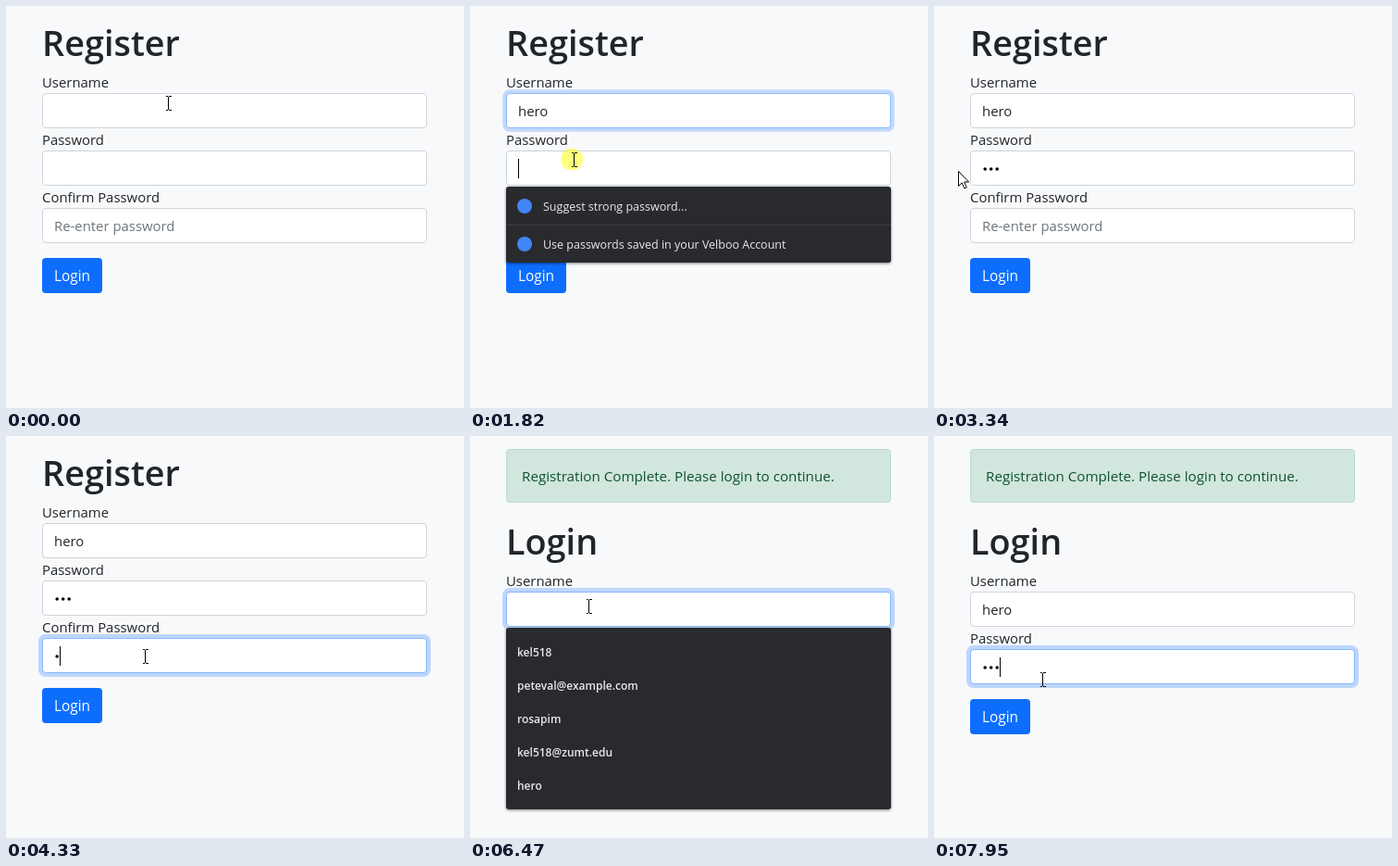
These frames come from a looping animation (495x434 px, 8000 ms). An HTML page:

```html
<!DOCTYPE html>
<html lang="en">
<head>
<meta charset="utf-8">
<title>Register and login</title>
<style>
  html, body { margin: 0; width: 100%; height: 100%; overflow: hidden; background: #f8f9fa; }
  svg { display: block; }
  text { font: 14.9px "Open Sans", "Noto Sans", sans-serif; fill: #212529; white-space: pre; }
  .title { font-size: 37.8px; font-weight: 600; }
  .hint { fill: #6c757d; }
  .box { fill: #fff; }
  .ring { fill: none; stroke: #0d6efd; }
  .btn-text { font-size: 15.4px; fill: #fff; }
  .note { fill: #d1e7dd; stroke: #badbcc; }
  .note-text { font-size: 15.2px; fill: #0f5132; }
  .drop { filter: drop-shadow(0 1px 1.5px rgba(0, 0, 0, .5)); }
  .drop text { font-size: 12.5px; fill: #e8eaed; }
  .drop .name { font-size: 12px; font-weight: 600; }
  .panel { fill: #292a2d; }
  .hover { fill: #3f4042; }
  .line { stroke: #3f4042; }
  .icon { fill: #4285f4; }
  .caret { fill: #000; }
  .click { fill: #ffff00; fill-opacity: .5; }
  .cursor { fill: #fff; stroke: #000; stroke-linejoin: round; }
  #beam { fill: none; shape-rendering: crispEdges; }
</style>
</head>
<body>
<svg id="stage" width="495" height="434" viewBox="0 0 495 434"></svg>
<script>
const LOOP = 8000, SUBMIT = 5130, PRESS = 4930, FADE = 150;
const USER = 'hero';
const names = ['kel518', 'peteval@example.com', 'rosapim', 'kel518@zumt.edu', USER];
const SUGGEST = 'Suggest strong password...';
const SAVED = 'Use passwords saved in your Velboo Account';

// focus: field gains focus and opens its list; input: first entry; blur: focus lost
const fields = [
  { page: 0, y: 94, label: 'Username', focus: 420, input: 1400, blur: 1810 },
  { page: 0, y: 156, label: 'Password', list: [SUGGEST, SAVED], focus: 1810, input: 2620, blur: 3150 },
  { page: 0, y: 218, label: 'Confirm Password', hint: 'Re-enter password', list: [SAVED], focus: 3830, input: 4330, blur: PRESS },
  { page: 1, y: 168, label: 'Username', focus: 6170, input: 6760, blur: 7150 },
  { page: 1, y: 230, label: 'Password', list: [SAVED], focus: 7150, input: 7480, blur: Infinity }
];
const KEY_GAP = 110;
const clicks = [400, 1380, 1780, 3140, 3810, 4920, 6130, 6740, 7130];

// time, x, y of the pointer
const path = [
  [0, 175, 105], [100, 175, 105], [380, 172, 116], [930, 172, 116],
  [1300, 75, 302], [1410, 75, 302], [1740, 108, 165], [1820, 112, 166], [2000, 114, 172],
  [2850, 114, 172], [3120, 28, 182], [3220, 28, 182], [3340, 26, 178], [3400, 26, 178],
  [3760, 150, 238], [4480, 150, 238], [4800, 78, 291], [5350, 78, 291],
  [6050, 128, 184], [6490, 128, 184], [6700, 76, 375], [6780, 76, 375],
  [7080, 117, 250], [7870, 117, 250], [7945, 117, 263], [LOOP, 117, 263]
];

const stage = document.getElementById('stage');
const text = (x, y, s, cls = '') => `<text x="${x}" y="${y}" class="${cls}">${s}</text>`;
const rect = (x, y, w, h, r, cls) =>
  `<rect x="${x}" y="${y}" width="${w}" height="${h}" rx="${r}" class="${cls}"/>`;

function fieldMarkup(f) {
  const dots = [0, 1, 2].map(i => `<circle class="dot" cx="${55.2 + i * 6.5}" cy="${f.y + 20}" r="1.8"/>`).join('');
  return `<g class="field">${text(39, f.y - 6, f.label)}
    ${rect(39, f.y, 416, 38, 4, 'ring')}${rect(39.5, f.y + .5, 415, 37, 3.5, 'box')}
    ${f.hint ? text(52, f.y + 25, f.hint, 'hint') : ''}
    ${f.list ? dots : text(52, f.y + 25, USER, 'value')}
    ${rect(52, f.y + 9, 1, 21, 0, 'caret')}</g>`;
}

function dropMarkup(f) {
  const top = f.y + 39;
  const rows = f.list
    ? f.list.map((s, i) => {
        const mid = top + 21 + i * 41;
        const rule = i ? `<path class="line" d="M39 ${mid - 20.5}h416"/>` : '';
        return `${rule}<circle class="icon" cx="59" cy="${mid}" r="8"/>${text(79, mid + 4.5, s)}`;
      })
    : names.map((s, i) => text(51, top + 30.5 + i * 36, s, 'name'));
  const height = f.list ? f.list.length * 41 : 196;
  return `<g class="drop">${rect(39, top, 416, height, 3, 'panel')}
    ${rect(39, top, 416, f.list ? 41 : 36, 0, 'hover')}${rows.join('')}</g>`;
}

function pageMarkup(page, title, shift, buttonY, extra) {
  return `<g class="page">${extra}${text(39, 54 + shift, title, 'title')}
    ${fields.filter(f => f.page === page).map(fieldMarkup).join('')}
    ${rect(39, buttonY, 65, 38, 4, 'ring btn-ring')}
    <rect class="btn" x="39" y="${buttonY}" width="65" height="38" rx="4" fill="#0d6efd"/>
    ${text(52, buttonY + 25, 'Login', 'btn-text')}</g>`;
}

const note = rect(39.5, 14.5, 415, 57, 3.5, 'note') +
  text(56, 49, 'Registration Complete. Please login to continue.', 'note-text');

stage.innerHTML = pageMarkup(0, 'Register', 0, 272, '') + pageMarkup(1, 'Login', 74, 284, note) +
  fields.map(dropMarkup).join('') + `
  <circle class="click" r="12"/>
  <path class="cursor" id="beam" d="M-3-7.5h2l1 1 1-1h2M0-6.5v13M-3 7.5h2l1-1 1 1h2"/>
  <path class="cursor" id="arrow" d="M.5 .5v16l3.7-3.6 2.7 6 2.4-1-2.7-5.9h5z"/>
  <path class="cursor" id="hand" d="M-2.5 12V2.6a1.75 1.75 0 0 1 3.5 0V8.5a1.6 1.6 0 0 1 3.3 .6a1.6 1.6 0 0 1 3.2 .8
    a1.5 1.5 0 0 1 2.8 1V15c0 3-2 3.5-2 7.5H-1c0-3-3-4-5.5-9c-1-2 1.5-3.2 4-.5zM1 8.5v3M4.300 9.100v3M7.500 9.900v2.500"/>`;

const all = s => [...stage.querySelectorAll(s)];
const show = (el, on) => { el.style.display = on ? '' : 'none'; };
const pages = all('.page'), drops = all('.drop'), fieldEls = all('.field');
const [clickEl] = all('.click');
const cursors = all('.cursor');
const buttons = all('.btn'), buttonRings = all('.btn-ring');
fields.forEach((f, i) => {
  const el = fieldEls[i], pick = s => el.querySelector(s);
  Object.assign(f, {
    ring: pick('.ring'), box: pick('.box'), hintEl: pick('.hint'), value: pick('.value'),
    caret: pick('.caret'), dots: [...el.querySelectorAll('.dot')],
    drop: drops[i], hover: drops[i].querySelector('.hover')
  });
});

const clamp = v => Math.max(0, Math.min(1, v));
const mix = (a, b, k) => a + (b - a) * k;

function pointer(t) {
  t = Math.max(0, t);
  const i = Math.max(1, path.findIndex(p => p[0] >= t));
  const [t0, x0, y0] = path[i - 1], [t1, x1, y1] = path[i];
  const k = clamp((t - t0) / (t1 - t0)), e = k * k * (3 - 2 * k);
  return { x: mix(x0, x1, e), y: mix(y0, y1, e) };
}

function setRing(el, k) {
  el.style.strokeWidth = 8 * k;
  el.style.strokeOpacity = .25 * k;
}

function drawField(f, t) {
  const k = clamp((t - f.focus) / FADE) - clamp((t - f.blur) / FADE);
  setRing(f.ring, k);
  f.box.style.stroke = `rgb(${mix(206, 134, k)}, ${mix(212, 183, k)}, ${mix(218, 254, k)})`;

  const filled = t >= f.input;
  const typed = filled ? Math.min(3, 1 + Math.floor((t - f.input) / KEY_GAP)) : 0;
  if (f.hintEl) show(f.hintEl, !filled);
  if (f.value) show(f.value, filled);
  f.dots.forEach((d, i) => show(d, i < typed));

  const last = !filled ? f.focus : f.list ? f.input + (typed - 1) * KEY_GAP : f.input;
  const active = t >= f.focus && t < f.blur && (f.list || filled);
  show(f.caret, active && (t - last) % 1000 < 500);
  const width = f.list ? typed * 6.4 : filled ? f.value.getComputedTextLength() : 0;
  f.caret.setAttribute('x', Math.round(52 + width));
}

// Returns true when the pointer is over this field's open list.
function drawDrop(f, t, p) {
  const open = t >= f.focus && t < f.input;
  show(f.drop, open);
  if (!open) return false;
  const top = f.y + 39 + (f.list ? 0 : 8), step = f.list ? 41 : 36;
  const row = Math.floor((p.y - top) / step);
  const over = row >= 0 && row < (f.list || names).length;
  show(f.hover, over);
  f.hover.setAttribute('y', top + row * step);
  return over;
}

function draw(t) {
  const page = t < SUBMIT ? 0 : 1, p = pointer(t);
  pages.forEach((el, i) => show(el, i === page));
  fields.forEach(f => drawField(f, t));
  const inList = fields.map(f => drawDrop(f, t, p)).some(Boolean);

  const buttonY = page ? 284 : 272;
  const onButton = p.x >= 39 && p.x < 104 && p.y >= buttonY && p.y < buttonY + 38;
  const onField = fields.some(f => f.page === page && p.x >= 39 && p.x < 455 && p.y >= f.y && p.y < f.y + 38);
  buttons[0].style.fill = onButton && !inList ? '#0b5ed7' : '#0d6efd';
  setRing(buttonRings[0], clamp((t - PRESS) / FADE));
  setRing(buttonRings[1], 0);

  const kind = inList ? 'arrow' : onButton ? 'hand' : onField ? 'beam' : 'arrow';
  const snap = kind === 'beam' ? .5 : 0;
  cursors.forEach(el => {
    show(el, el.id === kind);
    el.setAttribute('transform', `translate(${Math.round(p.x) + snap} ${Math.round(p.y)})`);
  });

  show(clickEl, clicks.some(c => t >= c && t < c + 170));
  const trail = pointer(t - 40);
  clickEl.setAttribute('cx', trail.x);
  clickEl.setAttribute('cy', trail.y);
}

const start = performance.now();
function tick() {
  draw((performance.now() - start) % LOOP);
  requestAnimationFrame(tick);
}
tick();
</script>
</body>
</html>
```
